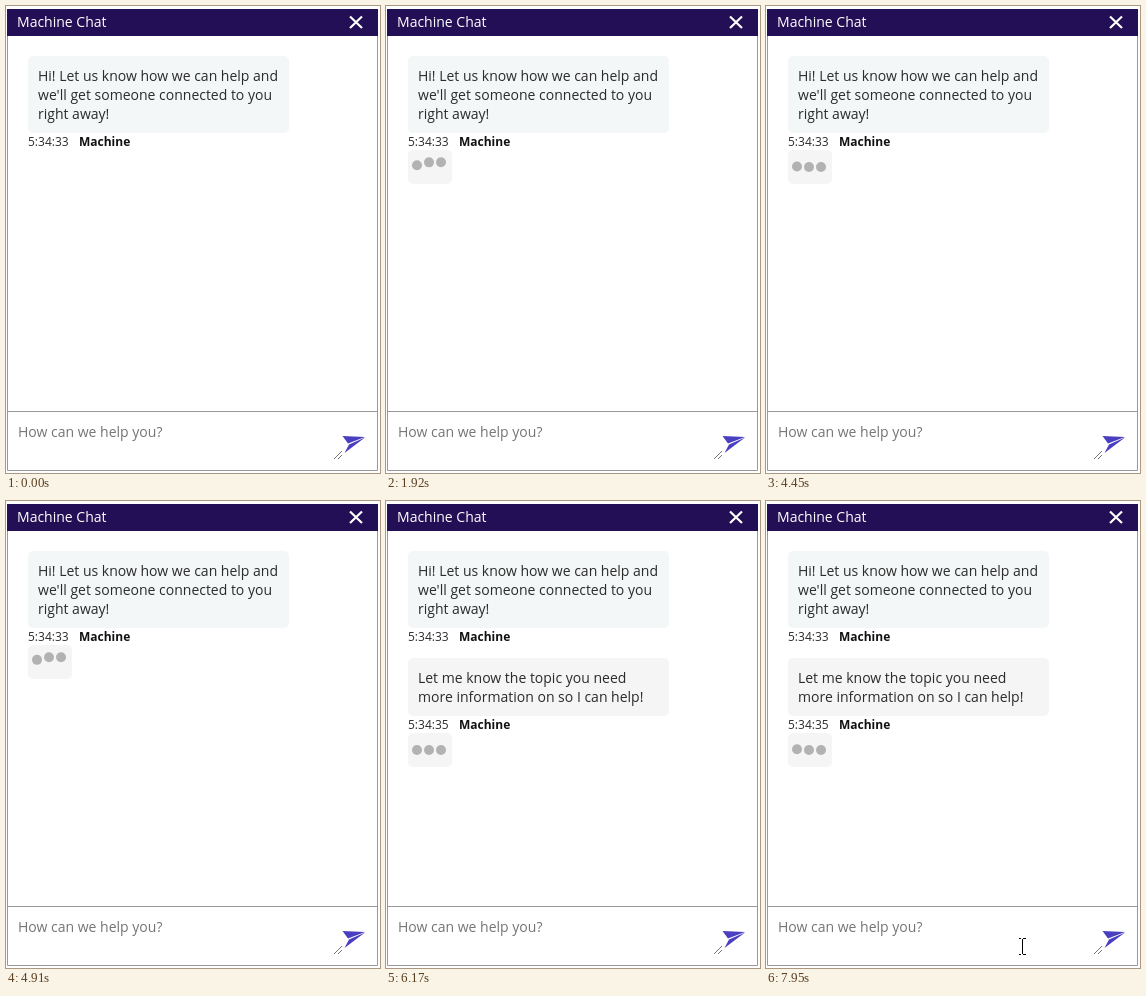
Animation, 374 px wide and 467 px high, one loop 8000 ms. Source, as an HTML page:

```html
<!DOCTYPE html>
<html lang="en">
<head>
<meta charset="utf-8">
<title>Chat</title>
<style>
html, body { margin: 0; height: 100%; overflow: hidden; background: #fff; }
svg { display: block; width: 374px; height: 467px; font: 14px "Open Sans", sans-serif; fill: #2b2b2b; }
.meta { font-size: 12px; }
.meta tspan { font-weight: 700; fill: #111; }
.line { fill: none; stroke: #989898; }
</style>
</head>
<body>
<svg viewBox="0 0 374 467">
  <path class="line" d="M1.5 3V464.5H371.5V3M1 405.5H372"/>
  <rect x="1" y="3" width="371" height="27" fill="#230f55"/>
  <text x="11" y="21" fill="#fff">Machine Chat</text>
  <path d="M344 10.5l12 11.5M356 10.5l-12 11.5" stroke="#fff" stroke-width="2.2"/>

  <rect x="22" y="50" width="261" height="77" rx="5" fill="#f4f7f7"/>
  <text x="32" y="75">Hi! Let us know how we can help and</text>
  <text x="32" y="94">we'll get someone connected to you</text>
  <text x="32" y="113">right away!</text>
  <text class="meta" x="22" y="140">5:34:33<tspan x="73">Machine</tspan></text>

  <g id="reply">
    <rect x="22" y="157" width="261" height="58" rx="5" fill="#f5f5f5"/>
    <text x="32" y="182">Let me know the topic you need</text>
    <text x="32" y="201">more information on so I can help!</text>
    <text class="meta" x="22" y="228">5:34:35<tspan x="73">Machine</tspan></text>
  </g>

  <g id="typing">
    <rect x="22" y="144" width="44" height="34" rx="5" fill="#f5f5f5"/>
    <g fill="#b2b2b2">
      <circle class="dot" cx="31" cy="161" r="5"/>
      <circle class="dot" cx="43" cy="161" r="5"/>
      <circle class="dot" cx="55" cy="161" r="5"/>
    </g>
  </g>

  <text x="12" y="431" fill="#757575">How can we help you?</text>
  <path d="M336.5 430L359 431L342 437.5ZM359 431.5L338.5 447L343 438.5Z" fill="#4a3fc0"/>
  <path d="M328 453l8-8M332 453l4-4" stroke="#777"/>
  <path id="cursor" d="M-3-7.5H-1M1-7.5H4M.5-7V8M-3 8.5H-1M1 8.5H4" fill="none" stroke="#000"/>
</svg>
<script>
const LOOP = 8000, PERIOD = 1500, HOP = 5;
const REPLY_AT = 6170, TYPING_AT = 1190;
const el = id => document.getElementById(id);
const dots = document.querySelectorAll(".dot");
const show = (node, on) => node.setAttribute("visibility", on ? "visible" : "hidden");
const ease = x => (1 - Math.cos(Math.PI * x)) / 2;

// Height of one dot: up until 28 % of the period, down again by 44 %.
function hop(t) {
  if (t < 0) return 0;
  const p = t % PERIOD / PERIOD;
  if (p < .28) return HOP * ease(p / .28);
  return p < .44 ? HOP * ease((.44 - p) / .16) : 0;
}

function draw(t) {
  const replied = t >= REPLY_AT;
  show(el("reply"), replied);
  show(el("typing"), t >= TYPING_AT);
  el("typing").setAttribute("transform", `translate(0 ${replied ? 88 : 0})`);
  const start = replied ? 6340 : 1360;
  dots.forEach((dot, i) => dot.setAttribute("cy", 161 - hop(t - start - i * 100)));

  // The pointer glides in from below, then makes one last small step.
  const left = 1 - Math.min(1, Math.max(0, (t - 7290) / 330));
  const glide = left * left;
  const nudge = t < 7950 ? 2 : 0;
  const x = Math.round(256 + nudge + 54 * glide);
  const y = Math.round(445 + nudge / 2 + 15 * glide);
  show(el("cursor"), t >= 7290);
  el("cursor").setAttribute("transform", `translate(${x} ${y})`);
}

const begin = performance.now();
function tick() {
  draw((performance.now() - begin) % LOOP);
  requestAnimationFrame(tick);
}
tick();
</script>
</body>
</html>
```
